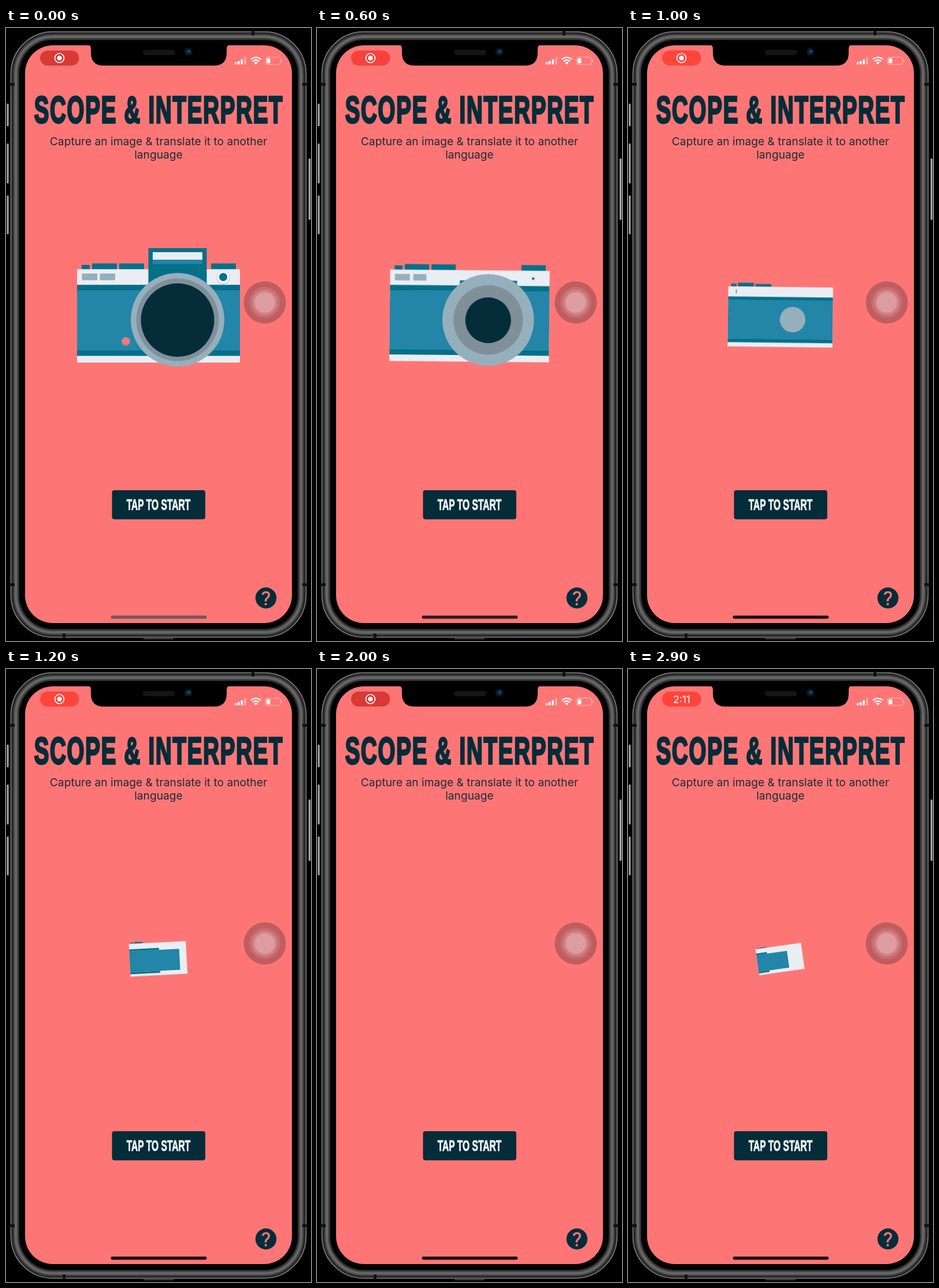
These frames come from a looping animation (528 px wide and 1061 px high, 3000 ms). An HTML page:

```html
<!DOCTYPE html>
<html lang="en">
<head>
<meta charset="utf-8">
<title>Camera intro</title>
<style>
html, body { margin: 0; width: 100%; height: 100%; overflow: hidden; background: #000; }
svg { display: block; width: 100%; height: 100%; }
text { text-anchor: middle; }

.navy { fill: #042c39; }
.teal { fill: #03708a; }
.blue { fill: #2385a7; }
.pale { fill: #e9eef4; }
.steel { fill: #96afbc; }
.grey { fill: #80909b; }
.coral { fill: #fd7675; }

.display { font: 700 64px "Liberation Sans", Arial, sans-serif; stroke-linejoin: miter; }
.title { letter-spacing: 3px; fill: #042c39; stroke: #042c39; stroke-width: 3.4px; }
.label { font-size: 26px; fill: #eef3f8; stroke: #eef3f8; stroke-width: 1px; }
.sub { font: 400 19.2px Inter, Roboto, sans-serif; fill: #1b2b38; }
.clock { font: 400 17.2px Inter, Roboto, sans-serif; fill: #fff; }
.help { font: 400 34px Roboto, Inter, sans-serif; stroke: #fd7675; stroke-width: .5px; }

.anim { animation: 3s linear infinite; }
.part { transform-box: fill-box; transform-origin: center; }
.left { transform-origin: left center; }
.base { transform-origin: center bottom; }

.cam { transform-origin: 263.2px 503.5px; animation-name: cam; }
@keyframes cam {
  0%, 16% { transform: none; }
  20% { transform: rotate(.5deg) scale(.98); }
  26.67% { transform: rotate(1deg) scale(.88); }
  33.33% { transform: rotate(.7deg) scale(.645); }
  36.67% { transform: rotate(-.4deg) scale(.495); }
  40% { transform: rotate(-2.9deg) scale(.351); }
  42% { transform: rotate(-8.2deg) scale(.28); }
  46.67% { transform: rotate(-22deg) scale(.16); }
  50% { transform: rotate(-34deg) scale(.105); }
  55.33% { transform: rotate(-54deg) scale(.048); }
  58.67%, 80% { transform: rotate(-66deg) scale(0); }
  83.33% { transform: rotate(-54deg) scale(.048); }
  88.67% { transform: rotate(-34deg) scale(.105); }
  92% { transform: rotate(-22deg) scale(.16); }
  96.67% { transform: rotate(-8.2deg) scale(.28); }
  98.67% { transform: rotate(-2.9deg) scale(.351); }
  100% { transform: rotate(-1.5deg) scale(.41); }
}
.panel { animation-name: panel; }
@keyframes panel {
  0%, 38.33% { transform: none; }
  40% { transform: scaleX(.88); }
  42% { transform: scaleX(.67); }
  50.33%, 88.33% { transform: scaleX(0); }
  96.67% { transform: scaleX(.67); }
  98.67% { transform: scaleX(.88); }
  100% { transform: scaleX(.96); }
}
.strip { animation-name: strip; }
@keyframes strip {
  0%, 36.67% { transform: none; }
  40% { transform: scaleX(.53); }
  42% { transform: scaleX(.23); }
  43.67%, 95% { transform: scaleX(0); }
  96.67% { transform: scaleX(.23); }
  98.67% { transform: scaleX(.53); }
  100% { transform: scaleX(.66); }
}
.tab1 { animation-name: tab1; }
@keyframes tab1 {
  0%, 38% { transform: none; }
  40% { transform: scaleY(.75); }
  42% { transform: scaleY(.5); }
  45%, 93.67% { transform: scaleY(0); }
  96.67% { transform: scaleY(.5); }
  98.67% { transform: scaleY(.75); }
  100% { transform: scaleY(.9); }
}
.tab2 { animation-name: tab2; }
@keyframes tab2 { 0%, 31.67% { transform: none; } 38.33%, 100% { transform: scaleY(0); } }
.tab3 { animation-name: tab3; }
@keyframes tab3 { 0%, 20% { transform: none; } 26.67% { transform: scaleY(.5); } 32%, 100% { transform: scaleY(0); } }
.win1 { animation-name: win1; }
@keyframes win1 { 0%, 24% { transform: none; } 26.67% { transform: scaleX(.8); } 35%, 100% { transform: scaleX(0); } }
.win2 { animation-name: win2; }
@keyframes win2 { 0%, 18.67% { transform: none; } 26.67% { transform: scaleX(.25); } 29.33%, 100% { transform: scaleX(0); } }
.dial { animation-name: dial; }
@keyframes dial { 0%, 13.67% { transform: none; } 23.33%, 100% { transform: scale(0); } }
.flash { animation-name: flash; }
@keyframes flash { 0%, 3% { transform: none; } 13.33% { transform: scaleY(.53); } 22.67%, 100% { transform: scaleY(0); } }
.pane { animation-name: pane; }
@keyframes pane { 0%, 2% { transform: none; } 10%, 100% { transform: scaleY(0); } }
.rim { animation-name: rim; }
@keyframes rim { 0%, 28% { transform: none; } 37.33%, 100% { transform: scale(0); } }
.ring { animation-name: ring; }
@keyframes ring { 0%, 15% { transform: none; } 26.67% { transform: scale(.676); } 33.33%, 100% { transform: scale(0); } }
.glass { animation-name: glass; }
@keyframes glass {
  0% { transform: none; }
  13.33% { transform: scale(1.06); }
  18.33% { transform: scale(.75); }
  26.67% { transform: scale(.197); }
  30%, 100% { transform: scale(0); }
}
.lamp { animation-name: lamp; }
@keyframes lamp { 0%, 4% { transform: none; } 13.67%, 100% { transform: scale(0); } }

.pill { animation-name: pill; animation-timing-function: ease-in-out; }
@keyframes pill {
  0% { fill: #d83a36; }
  30%, 40% { fill: #ff443b; }
  66.67% { fill: #d83a36; }
  97%, 100% { fill: #ff443b; }
}
.rec { animation-name: rec; }
@keyframes rec { 0%, 72% { opacity: 1; } 77%, 100% { opacity: 0; } }
.clock { animation-name: clock; }
@keyframes clock { 0%, 73% { opacity: 0; } 78%, 100% { opacity: 1; } }
.home { animation-name: home; }
@keyframes home {
  0% { fill: #75575e; }
  13.33% { fill: #3f2c31; }
  26.67% { fill: #1c1114; }
  40%, 100% { fill: #150d0f; }
}
</style>
</head>
<body>
<svg viewBox="0 0 528 1061" preserveAspectRatio="none">
  <defs>
    <linearGradient id="key" x2="1" y2="0">
      <stop offset="0" stop-color="#111"/>
      <stop offset=".5" stop-color="#ccc"/>
      <stop offset="1" stop-color="#111"/>
    </linearGradient>
    <filter id="soft"><feGaussianBlur stdDeviation="1.600"/></filter>
  </defs>

  <!-- phone body -->
  <rect width="528" height="1061"/>
  <g fill="url(#key)">
    <rect x=".5" y="131" width="5" height="39" rx="2"/>
    <rect x=".5" y="200" width="5" height="69" rx="2"/>
    <rect x=".5" y="290" width="5" height="67" rx="2"/>
    <rect x="523" y="226" width="5" height="106" rx="2"/>
  </g>
  <rect x="8" y="6" width="512" height="1049" rx="73" fill="#262626"/>
  <g fill="none">
    <rect x="17" y="15" width="494" height="1031" rx="64" stroke="#6a6a6a" stroke-width="6" filter="url(#soft)"/>
    <rect x="8.500" y="6.500" width="511" height="1048" rx="72.500" stroke="#858585" stroke-width="1.500"/>
  </g>
  <rect x="23" y="21" width="482" height="1019" rx="58"/>
  <g fill="#111">
    <rect x="425" y="4" width="5" height="9"/>
    <rect x="98" y="1048" width="5" height="9"/>
    <rect x="6" y="95" width="9" height="5"/>
    <rect x="513" y="95" width="9" height="5"/>
    <rect x="6" y="961" width="9" height="5"/>
    <rect x="513" y="961" width="9" height="5"/>
  </g>
  <rect x="238" y="1056" width="52" height="2" fill="#444"/>

  <!-- screen -->
  <rect class="coral" x="33" y="30" width="462" height="1000" rx="48"/>
  <path d="M142 29q5 1 5 7v7q0 22 22 22h191q22 0 22-22v-7q0-6 5-7z"/>
  <rect x="237" y="38" width="56" height="9" rx="4.500" fill="#151515"/>
  <circle cx="315.500" cy="41" r="7" fill="#0b1420"/>
  <circle cx="316" cy="41" r="4" fill="#0e2c45"/>
  <circle cx="317" cy="40" r="1.500" fill="#28618a"/>

  <!-- status bar -->
  <rect class="pill anim" x="59" y="39" width="67.500" height="26" rx="13"/>
  <g class="rec anim">
    <circle cx="92.500" cy="52" r="8" fill="none" stroke="#fff" stroke-width="1.600"/>
    <circle cx="92.500" cy="52" r="4" fill="#fff"/>
  </g>
  <text class="clock anim" x="93" y="58.500">2:11</text>
  <g fill="#fff">
    <rect x="396" y="59" width="3.500" height="4" rx="1"/>
    <rect x="401" y="57" width="3.500" height="6" rx="1"/>
    <rect x="406.500" y="54" width="3.500" height="9" rx="1"/>
    <rect x="412" y="50" width="3.500" height="13" rx="1" opacity=".4"/>
    <path d="M432.500 63l-3.200-3.300a4.600 4.600 0 0 1 6.400 0z"/>
    <rect x="451" y="52.500" width="6.500" height="8.500" rx="1.500"/>
    <path d="M477 54.500q2.500 2.300 0 4.600z" opacity=".6"/>
  </g>
  <g fill="none" stroke="#fff">
    <path d="M426.900 57.600a8 8 0 0 1 11.200 0M424 54.400a12.200 12.200 0 0 1 17 0" stroke-width="2.300"/>
    <rect x="449" y="50.500" width="26.500" height="12.500" rx="3.500" opacity=".55"/>
  </g>

  <!-- copy -->
  <text class="display title" transform="translate(264.500 163.500) scale(.6 1)">SCOPE &amp; INTERPRET</text>
  <text class="sub" x="264" y="202.500">Capture an image &amp; translate it to another</text>
  <text class="sub" x="264" y="226">language</text>

  <!-- camera -->
  <g class="cam anim">
    <rect class="teal part base tab1 anim" x="131" y="410" width="14" height="8"/>
    <rect class="teal part base tab1 anim" x="149" y="407.500" width="43" height="10.500"/>
    <rect class="teal part base tab2 anim" x="196" y="407.500" width="43" height="10.500"/>
    <rect class="teal part base tab3 anim" x="355" y="407.500" width="43" height="10.500"/>
    <rect class="pale" x="123" y="417.500" width="282" height="161.500"/>
    <g class="part left strip anim">
      <rect class="teal" x="123" y="444.500" width="282" height="10"/>
      <rect class="teal" x="123" y="557.500" width="282" height="10"/>
    </g>
    <rect class="blue part left panel anim" x="123" y="454" width="282" height="104"/>
    <rect class="steel part win1 anim" x="131.500" y="425" width="26.500" height="11.500"/>
    <rect class="steel part win2 anim" x="162.500" y="425" width="26.500" height="11.500"/>
    <g class="part dial anim">
      <circle cx="376" cy="431.500" r="12" fill="#c5d1da"/>
      <circle cx="376" cy="431" r="11" fill="#f1f5f8"/>
      <circle class="teal" cx="376" cy="431" r="7"/>
    </g>
    <g class="part base flash anim">
      <rect class="teal" x="246.500" y="381" width="101" height="64"/>
      <g class="part base pane anim">
        <rect class="pale" x="254" y="388" width="86" height="13"/>
        <rect class="blue" x="254" y="401" width="86" height="7.500"/>
      </g>
    </g>
    <g class="part lamp anim">
      <circle class="grey" cx="207.500" cy="542.500" r="7.800"/>
      <circle class="coral" cx="207.500" cy="542" r="6.300"/>
    </g>
    <circle class="steel part rim anim" cx="297" cy="505" r="81"/>
    <circle class="grey part ring anim" cx="297" cy="505" r="71.500"/>
    <circle class="navy part glass anim" cx="297" cy="505.500" r="63.500"/>
  </g>

  <!-- floating touch control -->
  <g>
    <circle cx="448" cy="475" r="36.500" fill="#bf5d5f"/>
    <circle cx="448" cy="475" r="27" fill="#c76c70"/>
    <circle cx="448" cy="475" r="22.500" fill="#d17f83"/>
    <circle cx="448" cy="475" r="18" fill="#dd9c9f"/>
  </g>

  <!-- controls -->
  <rect x="184" y="801" width="160.500" height="50" rx="5" fill="#a94f52" opacity=".4"/>
  <rect class="navy" x="183.500" y="800" width="161.500" height="50.300" rx="4"/>
  <text class="display label" transform="translate(264 834) scale(.6 1)">TAP TO START</text>
  <circle class="navy" cx="450" cy="986.500" r="18.200"/>
  <text class="help coral" x="450" y="998.500">?</text>
  <rect class="home anim" x="181.500" y="1017" width="166" height="5.500" rx="2.700"/>
</svg>
</body>
</html>
```
